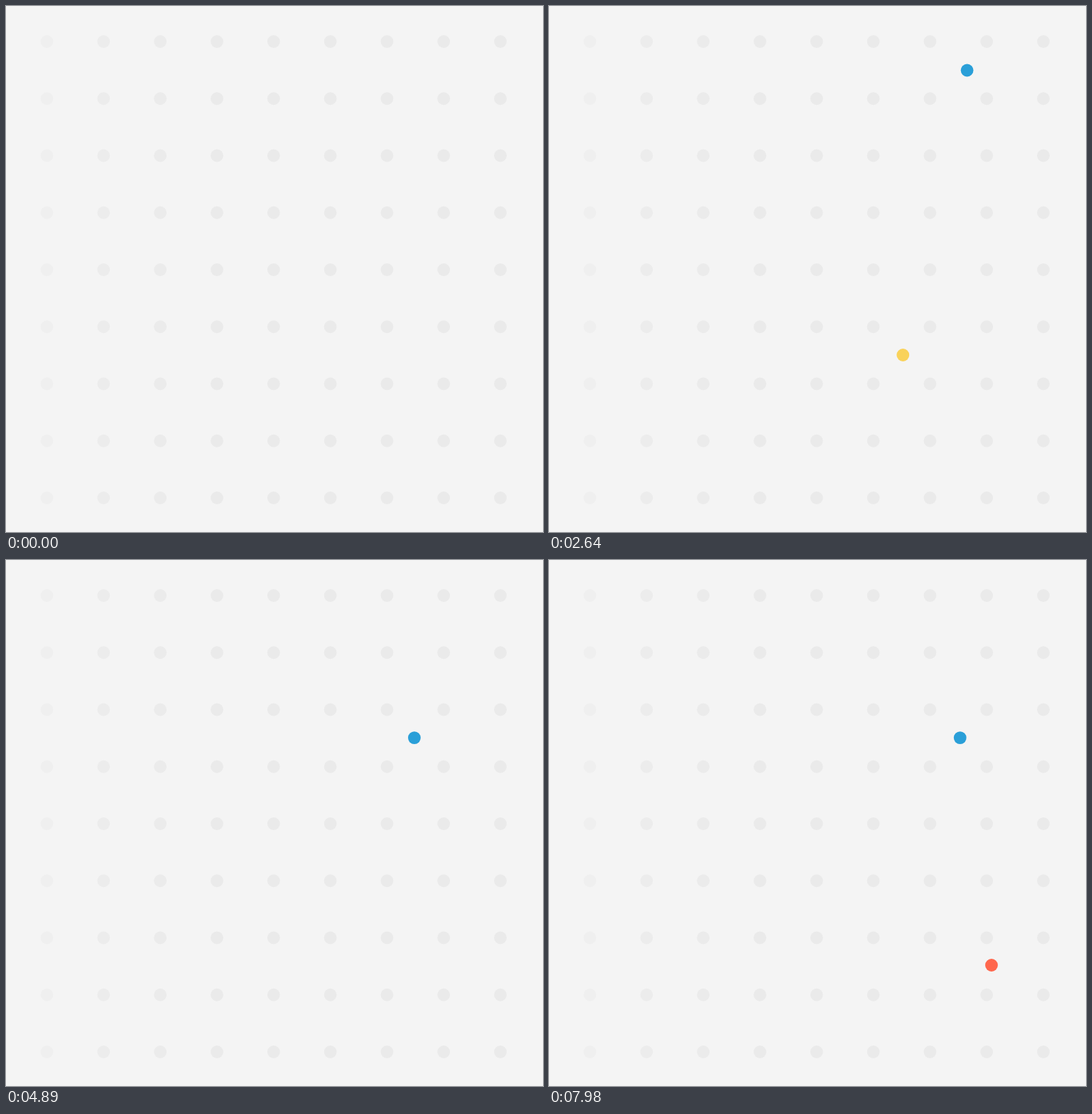
Write an HTML page that moves like this. It is 756 px wide and 740 px high and loops after 8 s.

```html
<!DOCTYPE html>
<html lang="en">
<head>
<meta charset="utf-8">
<title>Dots</title>
<style>
  html, body { margin: 0; width: 100%; height: 100%; overflow: hidden; background: #f4f4f4; }
  svg { display: block; width: 756px; height: 740px; }
</style>
</head>
<body>
<svg id="stage" viewBox="0 0 756 740" xmlns="http://www.w3.org/2000/svg"></svg>
<script>
const LOOP = 8000, TICK = 30, CELL = 79.8, RADIUS = 8.9;
const stage = document.getElementById('stage');

function circle(x, y, fill) {
  const el = document.createElementNS('http://www.w3.org/2000/svg', 'circle');
  Object.entries({ cx: x, cy: y, r: RADIUS, fill }).forEach(([k, v]) => el.setAttribute(k, v));
  return stage.appendChild(el);
}

// Background grid, fading towards the left edge
for (let row = 0; row < 9; row++)
  for (let col = 0; col < 9; col++) {
    const grey = Math.round(234 + 5 * 0.4 ** col);
    circle(57.6 + CELL * col, 50 + 80.25 * row, `rgb(${grey},${grey},${grey})`);
  }

// Progress along cubic-bezier(k, 0, 1 - k, 1): a larger k is slower at the ends
function ease(p, k) {
  if (p <= 0) return 0;
  if (p >= 1) return 1;
  let lo = 0, hi = 1;
  for (let i = 0; i < 30; i++) {
    const u = (lo + hi) / 2, w = 1 - u, s = u * u * (3 - 2 * u);
    if (s + 3 * k * u * w * (w - u) < p) lo = u;
    else hi = u;
  }
  return lo * lo * (3 - 2 * lo);
}

const move = (start, span, dx, dy, k) => t => {
  const s = CELL * ease((t - start) / span, k);
  return [dx * s, dy * s];
};

// Each dot slides by whole cells from its first place
const dots = [
  { el: circle(0, 0, '#2a9fd8'), x: 813.3, y: 90.5, moves: [
    move(1171, 2029, -3, 0, 0.8),
    move(3204, 1555, 0, 2, 0.78),
    move(4762, 1513, 3, 0, 0.8),
    move(6305, 2029, -3, 0, 0.8)
  ] },
  { el: circle(0, 0, '#f9d25a'), x: 657.9, y: 810.2, moves: [
    move(132, 1368, 0, -4, 0.7),
    move(1514, 1123, -2, 0, 1),
    move(3116, 1774, 0, -7, 0.74)
  ] },
  { el: circle(0, 0, '#ff674d'), x: 652.8, y: -68.4, moves: [
    move(5867, 1353, 0, 8, 0.59),
    move(7522, 1006, -2, 0, 1)
  ] }
];

function draw(now) {
  const t = Math.floor((now % LOOP) / TICK) * TICK;
  for (const dot of dots) {
    let { x, y } = dot;
    for (const step of dot.moves) {
      const [dx, dy] = step(t);
      x += dx;
      y += dy;
    }
    dot.el.setAttribute('cx', x.toFixed(2));
    dot.el.setAttribute('cy', y.toFixed(2));
  }
}

let begin;
function frame(now) {
  begin ??= now;
  draw(now - begin);
  requestAnimationFrame(frame);
}
draw(0);
requestAnimationFrame(frame);
</script>
</body>
</html>
```
